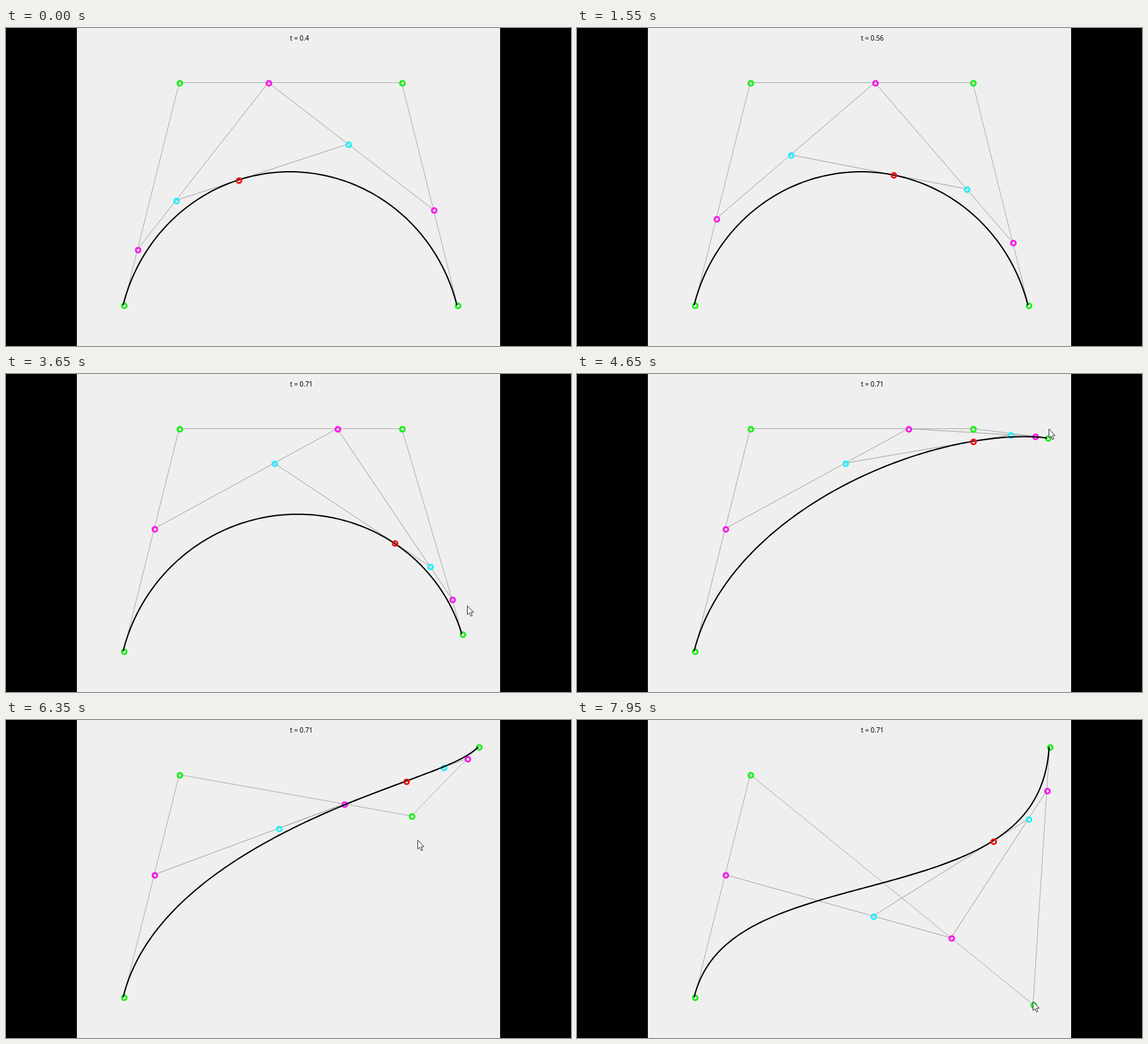
Recreate the animation shown at these times as an HTML page with a canvas. Size 853x480 px, loop 8000 ms.

```html
<!DOCTYPE html>
<html lang="en">
<head>
<meta charset="utf-8">
<title>Rational Bézier construction</title>
<style>
  html, body { margin: 0; width: 100%; height: 100%; overflow: hidden; background: #000; }
  canvas { display: block; }
</style>
</head>
<body>
<canvas id="stage" width="853" height="480"></canvas>
<script>
const ctx = document.getElementById('stage').getContext('2d');
const LOOP = 8000, LAG = 110;
const LEFT = 107, WIDTH = 639;
const COLORS = ['#14f014', '#fa14f0', '#1ef0fa', '#f01010'];
const WEIGHTS = [1, 0.5, 0.5, 1];
const ARROW = new Path2D('M0 0V13.5L3 10.7 5.3 15.8 7.4 14.9 5.2 10H9.4Z');

// Pointer stops: time, x, y
const STOPS = [
  [2200, 750, 425], [3000, 681, 414], [3420, 681, 414], [3650, 696, 350],
  [4540, 710, 92], [4650, 712, 83], [5150, 713, 36], [5450, 713, 36],
  [5850, 597, 78], [6020, 597, 78], [6350, 621, 181], [7050, 664, 376],
  [7550, 686, 433], [7840, 688, 425]
];
const LAST = STOPS.length - 1;

const clamp = (v, lo, hi) => Math.min(hi, Math.max(lo, v));

const slope = (i, k) => (STOPS[i + 1][k] - STOPS[i][k]) / (STOPS[i + 1][0] - STOPS[i][0]);

function tangent(i, k) {
  if (i === 0 || i === LAST) return 0;
  const a = slope(i - 1, k), b = slope(i, k);
  return a * b > 0 ? 2 * a * b / (a + b) : 0;
}

// Monotone cubic interpolation between the stops
function pointer(ms) {
  ms = clamp(ms, STOPS[0][0], STOPS[LAST][0]);
  let i = 0;
  while (i < LAST - 1 && ms > STOPS[i + 1][0]) i++;
  const h = STOPS[i + 1][0] - STOPS[i][0], u = (ms - STOPS[i][0]) / h;
  const s = u * u * (3 - 2 * u);
  return [1, 2].map(k =>
    STOPS[i][k] * (1 - s) + STOPS[i + 1][k] * s +
    h * u * (1 - u) * ((1 - u) * tangent(i, k) - u * tangent(i + 1, k)));
}

// Position of a point held by the pointer between two times
function dragged(ms, from, to) {
  const [x, y] = pointer(clamp(ms - LAG, from, to));
  return [x + 1.5, y + 5.5];
}

// All levels of the weighted de Casteljau construction
function levels(points, t) {
  let row = points.map((p, i) => [...p, WEIGHTS[i]]);
  const rows = [row];
  while (row.length > 1) {
    row = row.slice(1).map((b, i) => {
      const a = row[i], wa = a[2] * (1 - t), wb = b[2] * t, w = wa + wb;
      return [(a[0] * wa + b[0] * wb) / w, (a[1] * wa + b[1] * wb) / w, w];
    });
    rows.push(row);
  }
  return rows;
}

// Lines sit slightly up and left of the ring centres
function polyline(points, color, width, dx, dy) {
  ctx.beginPath();
  points.forEach(([x, y]) => ctx.lineTo(x + dx, y + dy));
  ctx.strokeStyle = color;
  ctx.lineWidth = width;
  ctx.stroke();
}

function rings(row, color) {
  ctx.strokeStyle = color;
  ctx.lineWidth = 2.7;
  for (const [x, y] of row) {
    ctx.beginPath();
    ctx.arc(x, y, 3.6, 0, 7);
    ctx.stroke();
  }
}

function drawPointer(ms) {
  const [x, y] = pointer(ms);
  ctx.save();
  ctx.translate(x + 0.5, y);
  ctx.fillStyle = '#fff';
  ctx.fill(ARROW);
  ctx.strokeStyle = '#333';
  ctx.lineWidth = 1;
  ctx.stroke(ARROW);
  ctx.restore();
}

function draw(ms) {
  const steps = clamp(Math.floor((ms - 430) / 70), 0, 31);
  const t = (40 + steps) / 100;
  const points = [
    [178.5, 419.3], [262.5, 83.5],
    dragged(ms, 6020, LOOP), dragged(ms, 3420, 5450)
  ];
  const rows = levels(points, t);
  const curve = Array.from({ length: 151 }, (_, i) => levels(points, i / 150)[3][0]);

  ctx.fillStyle = '#000';
  ctx.fillRect(0, 0, 853, 480);
  ctx.save();
  ctx.beginPath();
  ctx.rect(LEFT, 0, WIDTH, 480);
  ctx.clip();
  ctx.fillStyle = '#efefef';
  ctx.fillRect(LEFT, 0, WIDTH, 480);

  ctx.fillStyle = '#000';
  ctx.font = '10px "Noto Sans", "Open Sans", sans-serif';
  ctx.fillText('t = ' + t, 428.7, 19.3);

  rows.slice(0, 3).forEach((row, i) => polyline(row, i ? '#a2a2a2' : '#acacac', 1, -1, -1));
  rows.slice(0, 3).forEach((row, i) => rings(row, COLORS[i]));
  polyline(curve, '#000', 2, -1.7, -0.8);
  rings(rows[3], COLORS[3]);

  if (ms >= STOPS[0][0]) drawPointer(ms);
  ctx.restore();
}

function frame() {
  draw(performance.now() % LOOP);
  requestAnimationFrame(frame);
}
frame();
</script>
</body>
</html>
```
